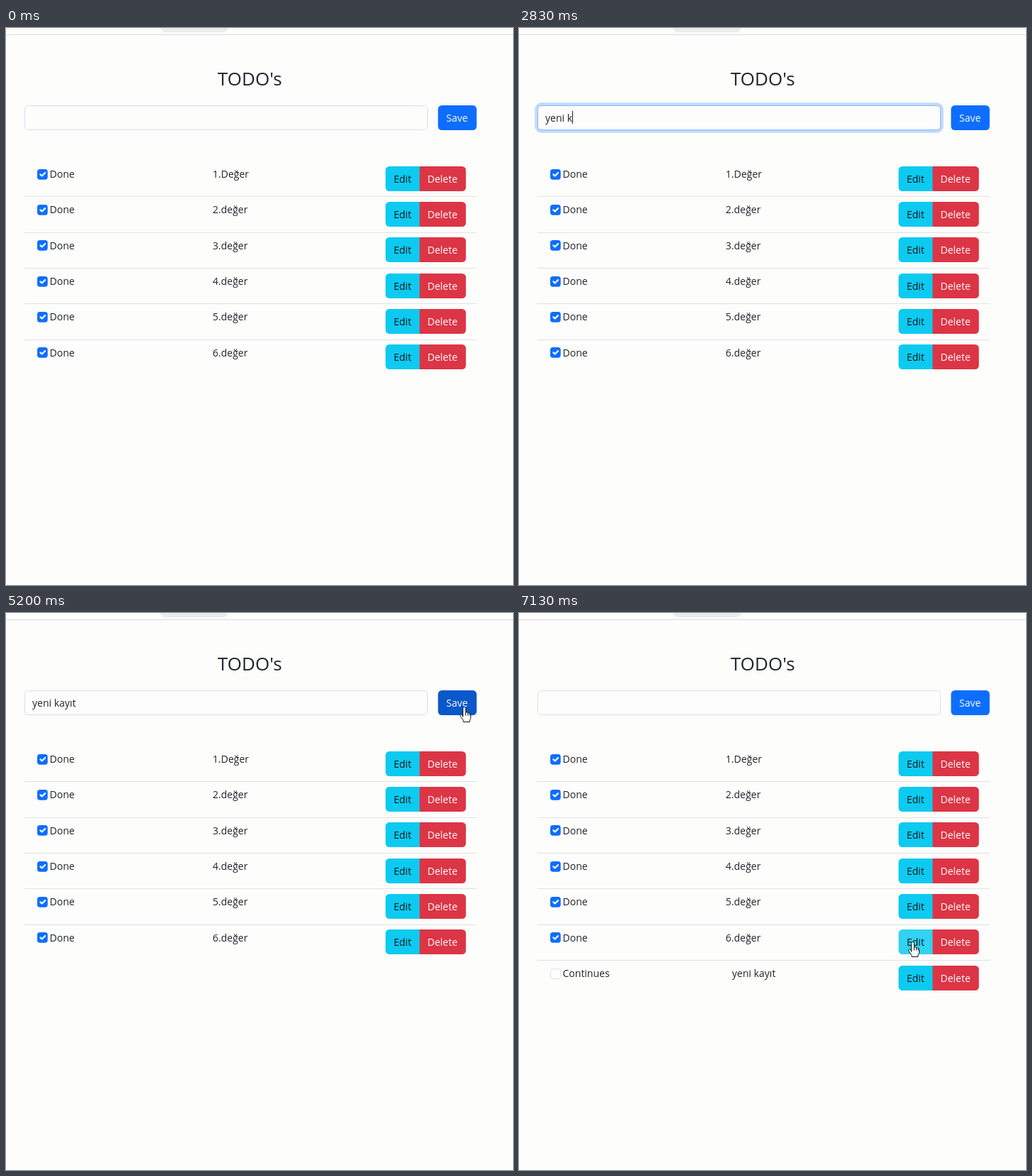
Write an HTML page with a canvas that moves like this. It is 714 px wide and 785 px high and loops after 8 s.

```html
<!DOCTYPE html>
<html lang="tr">
<head>
<meta charset="utf-8">
<title>TODO's</title>
<style>
  html, body { margin: 0; width: 714px; height: 785px; overflow: hidden; background: #fdfdfc; }
  canvas { display: block; }
</style>
</head>
<body>
<canvas id="stage" width="714" height="785"></canvas>
<script>
const ctx = document.getElementById('stage').getContext('2d');
const LOOP = 8000, FADE = 150, BLINK = 530;
const FOCUS_AT = 1290, PRESS_AT = 5050, RELEASE_AT = 5235, ADD_AT = 5265;
const FONT = '"Open Sans", "Noto Sans", sans-serif';
const PAGE = '#fdfdfc';
const ROW_TOP = 195, ROW_STEP = 50.35;

const INPUT = { x: 26, y: 109, w: 568, h: 35 };
const SAVE = { x: 608.4, y: 109, w: 54.4, h: 35 };
const ENTRY = 'yeni kayıt';
const KEY_TIMES = [2130, 2200, 2430, 2530, 2670, 2830, 2970, 3230, 3370, 3500];

// Pointer waypoints: time, x, y
const PATH = [
  [730, 15, 24], [830, 55, 58], [950, 118, 107], [1070, 150, 127], [1500, 150, 127],
  [1780, 124, 128], [4030, 124, 128], [4230, 293, 142], [4480, 500, 149],
  [4690, 622, 150], [4830, 648, 136], [4900, 645, 132], [5550, 645, 132],
  [5570, 644, 131], [5890, 644, 131], [6040, 590, 218], [6190, 531, 296], [6370, 534, 346],
  [6520, 543, 368], [6700, 548, 372], [6900, 553, 450], [7010, 555, 474],
  [7130, 554, 463], [8000, 554, 463]
];

const ARROW = new Path2D('M0 0V15.2L3.5 11.9L5.9 17.1L8.2 16.1L5.9 11H10.7Z');
const HAND = new Path2D('M-2 14V2Q-2 0 0 0Q2 0 2 2V7.5Q4.5 6.5 5 8.5Q7 7.5 7.5 9.3Q9 8.8 9 11V15' +
  'Q9 17 7.5 18.5V21H-1.5V19L-5.5 13Q-6.5 11 -5 10.3Q-4 10 -2 13Z');
const KNUCKLES = new Path2D('M2 7.5V12M5 8.5V12M7.5 9.3V12');
const BEAM = new Path2D('M-3 -7.5H-1L0 -6.5L1 -7.5H3M0 -6.5V6.5M-3 7.5H-1L0 6.5L1 7.5H3');
const TICK = new Path2D('M6 10L9 13L15 7');

const clamp = v => Math.max(0, Math.min(1, v));
const easeOut = v => 1 - (1 - clamp(v)) ** 2;
const inside = (p, b) => p && p.x >= b.x && p.x < b.x + b.w && p.y >= b.y && p.y < b.y + b.h;
const mix = (a, b, k) => `rgb(${a.map((v, i) => Math.round(v + (b[i] - v) * k))})`;

function tangent(i, axis) {
  const a = PATH[i - 1], b = PATH[i], c = PATH[i + 1];
  if (!a || !c) return 0;
  const still = (p, q) => p[1] === q[1] && p[2] === q[2];
  return still(a, b) || still(b, c) ? 0 : (c[axis] - a[axis]) / (c[0] - a[0]);
}

function pointer(t) {
  if (t < PATH[0][0]) return null;
  const i = PATH.findIndex((p, n) => n + 1 < PATH.length && t < PATH[n + 1][0]);
  const a = PATH[i], b = PATH[i + 1], d = b[0] - a[0], u = (t - a[0]) / d;
  const at = axis =>
    a[axis] * (1 + 2 * u) * (1 - u) ** 2 + b[axis] * u * u * (3 - 2 * u) +
    d * u * (1 - u) * (tangent(i, axis) * (1 - u) - tangent(i + 1, axis) * u);
  return { x: at(1), y: at(2) };
}

// Share of the last fade period spent over a box
function hover(box, t) {
  let hits = 0;
  for (let n = 0; n < 10; n++) hits += inside(pointer(t - n * FADE / 10), box);
  return hits / 10;
}

const rowCount = t => t >= ADD_AT ? 7 : 6;
const rowButtons = i => {
  const y = Math.floor(ROW_TOP + i * ROW_STEP);
  return { edit: { x: 534.5, y, w: 48, h: 35 }, del: { x: 582, y, w: 65.7, h: 35 } };
};

function rounded(b, radius, fill, stroke, width = 1) {
  ctx.beginPath();
  ctx.roundRect(b.x, b.y, b.w, b.h, radius);
  if (fill) { ctx.fillStyle = fill; ctx.fill(); }
  if (stroke) { ctx.strokeStyle = stroke; ctx.lineWidth = width; ctx.stroke(); }
}

function text(str, x, y, color = '#212529', font = '14px') {
  ctx.font = `${font} ${FONT}`;
  ctx.fillStyle = color;
  ctx.fillText(str, x, y);
}

function line(x, y, w, color) {
  ctx.fillStyle = color;
  ctx.fillRect(x, y, w, 1);
}

function drawInput(t) {
  const focus = easeOut((t - FOCUS_AT) / FADE) * (1 - easeOut((t - PRESS_AT) / FADE));
  const { x, y, w, h } = INPUT;
  if (focus > 0) {
    const s = 3.7 * focus;
    rounded({ x: x - s, y: y - s, w: w + 2 * s, h: h + 2 * s }, 5.5 + s, `rgba(13,110,253,${0.25 * focus})`);
  }
  rounded({ x: x + .5, y: y + .5, w: w - 1, h: h - 1 }, 5,
    PAGE, mix([217, 221, 234], [134, 183, 254], focus));

  const typed = KEY_TIMES.filter(k => t >= k);
  const value = t < ADD_AT ? ENTRY.slice(0, typed.length) : '';
  text(value, 37, 131.5);
  if (t >= FOCUS_AT && t < PRESS_AT) {
    const since = t - (typed.length ? typed[typed.length - 1] : FOCUS_AT - 20);
    if (Math.floor(since / BLINK) % 2 === 0) {
      ctx.fillStyle = '#212529';
      ctx.fillRect(Math.round(37 + ctx.measureText(value).width), 117, 1, 18);
    }
  }
}

function drawSave(t) {
  const press = easeOut((t - PRESS_AT) / FADE) * (1 - easeOut((t - RELEASE_AT) / FADE));
  const h = hover(SAVE, t);
  const base = [13, 110, 253].map((v, i) => v + ([11, 94, 215][i] - v) * h);
  rounded(SAVE, 5.5, mix(base, [10, 88, 202], press));
  text('Save', 620, 131.5, '#fff');
}

function drawRow(i, t) {
  const y = ROW_TOP + i * ROW_STEP, isNew = i === 6;
  if (i) line(26, Math.round(y - 8), 637, '#dfe1e6');

  const boxTop = Math.round(y + 3.6);
  if (isNew) {
    rounded({ x: 44.5, y: boxTop + .5, w: 14, h: 14 }, 3.5, '#fefefe', '#dee2e6');
  } else {
    rounded({ x: 44, y: boxTop, w: 14.7, h: 14.7 }, 3.7, '#0d6efd');
    ctx.save();
    ctx.translate(44, boxTop);
    ctx.scale(.735, .735);
    ctx.strokeStyle = '#fff';
    ctx.lineWidth = 3;
    ctx.lineCap = ctx.lineJoin = 'round';
    ctx.stroke(TICK);
    ctx.restore();
  }
  const base = Math.round(y + 16);
  text(isNew ? 'Continues' : 'Done', 61.5, base);
  text(isNew ? ENTRY : `${i + 1}.${i ? 'd' : 'D'}eğer`, isNew ? 300 : 291, base);

  const { edit, del } = rowButtons(i);
  rounded(del, [0, 5.5, 5.5, 0], mix([220, 53, 69], [187, 45, 59], hover(del, t)));
  rounded(edit, [5.5, 0, 0, 5.5], mix([13, 202, 240], [49, 210, 242], hover(edit, t)));
  text('Edit', 546, edit.y + 23, '#101418');
  text('Delete', 593.5, del.y + 23, '#fff');
}

function drawPointer(t) {
  const p = pointer(t);
  const hiddenWhileTyping = t >= 2430 && t < 3500;
  if (!p || hiddenWhileTyping) return;
  const buttons = [SAVE];
  for (let i = 0; i < rowCount(t); i++) buttons.push(...Object.values(rowButtons(i)));

  ctx.save();
  ctx.lineWidth = 1;
  ctx.lineJoin = 'round';
  ctx.strokeStyle = '#111';
  ctx.fillStyle = '#fff';
  ctx.translate(Math.round(p.x) + .5, Math.round(p.y) + .5);
  if (inside(p, INPUT)) {
    ctx.stroke(BEAM);
  } else if (buttons.some(b => inside(p, b))) {
    ctx.fill(HAND);
    ctx.stroke(HAND);
    ctx.stroke(KNUCKLES);
  } else {
    ctx.fill(ARROW);
    ctx.stroke(ARROW);
  }
  ctx.restore();
}

function draw(t) {
  ctx.fillStyle = PAGE;
  ctx.fillRect(0, 0, 714, 785);
  rounded({ x: 217, y: -20, w: 96, h: 26 }, 8, '#ebebec');
  line(0, 9, 714, '#d9dae2');
  text("TODO's", 298, 81, '#212529', '500 26px');
  drawInput(t);
  drawSave(t);
  for (let i = 0; i < rowCount(t); i++) drawRow(i, t);
  drawPointer(t);
}

const start = performance.now();
function tick() {
  draw((performance.now() - start) % LOOP);
  requestAnimationFrame(tick);
}
tick();
</script>
</body>
</html>
```
